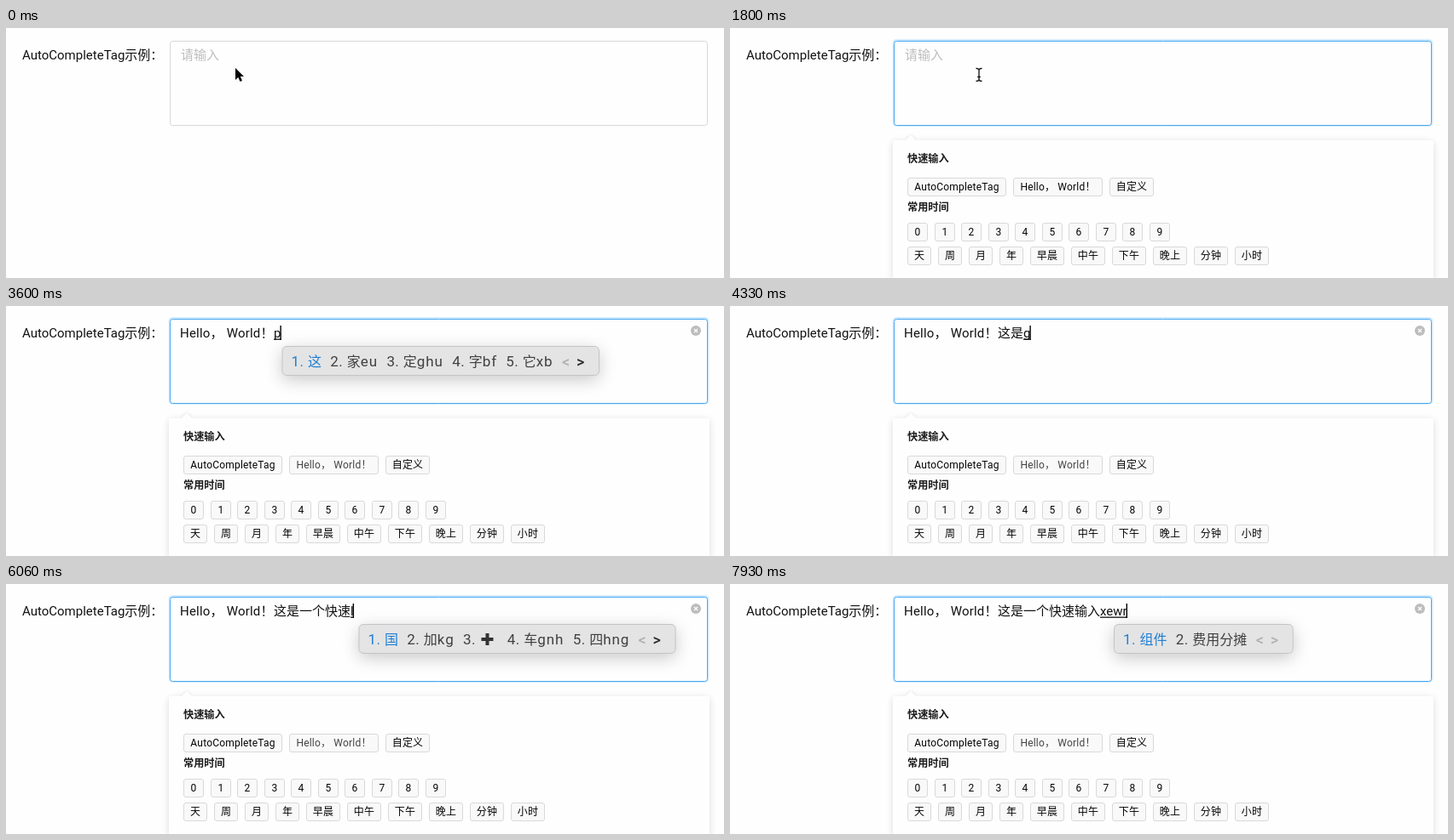
Write an HTML page with a canvas that moves like this. It is 842 by 294 pixels and loops after 8 s.

```html
<!DOCTYPE html>
<html lang="zh-CN">
<head>
<meta charset="utf-8">
<title>AutoCompleteTag</title>
<style>
html, body { margin: 0; width: 100%; height: 100%; overflow: hidden; background: #fefefe; }
canvas { display: block; width: 842px; height: 294px; }
</style>
</head>
<body>
<canvas id="stage"></canvas>
<script>
const W = 842, H = 294, LOOP = 8000;
const BG = '#fefefe', INK = '#111';
const FAMILY = 'Roboto, "Noto Sans CJK SC", "Noto Sans CJK", sans-serif';
const canvas = document.getElementById('stage');
const ctx = canvas.getContext('2d');
const dpr = window.devicePixelRatio || 1;
canvas.width = W * dpr;
canvas.height = H * dpr;

const clamp = v => Math.max(0, Math.min(1, v));
const span = (t, a, b) => clamp((t - a) / (b - a));
const smooth = p => p * p * (3 - 2 * p);
const outCirc = p => Math.sqrt(1 - (p - 1) ** 2);
const mix = (a, b, p) => a + (b - a) * p;
const mixColor = (a, b, p) => `rgb(${a.map((v, i) => Math.round(mix(v, b[i], p)))})`;

function setFont(size, weight = 400, spacing = 0) {
  ctx.font = `${weight} ${size}px ${FAMILY}`;
  ctx.letterSpacing = spacing + 'px';
}

// y is the visual middle of the line
function label(str, x, y, size, color, weight, spacing) {
  setFont(size, weight, spacing);
  ctx.fillStyle = color;
  ctx.fillText(str, x, y + size * 0.37);
  return ctx.measureText(str).width;
}

function box(x, y, w, h, r, fill, stroke) {
  ctx.beginPath();
  ctx.roundRect(x, y, w, h, r);
  if (fill) { ctx.fillStyle = fill; ctx.fill(); }
  if (stroke) { ctx.strokeStyle = stroke; ctx.lineWidth = 1; ctx.stroke(); }
}

// shadow only outside the shape, so it never shows through a faded fill
function castShadow(shape, color, blur, dy) {
  const outside = new Path2D();
  outside.rect(-W, -H, 3 * W, 3 * H);
  outside.addPath(shape);
  ctx.save();
  ctx.clip(outside, 'evenodd');
  ctx.shadowColor = color;
  ctx.shadowBlur = blur * dpr;
  ctx.shadowOffsetY = dy * dpr;
  ctx.fillStyle = '#fff';
  ctx.fill(shape);
  ctx.restore();
}

// typing: [time, committed text, letters in progress, candidates]
const ONE = '一 五ghg 王ggg 不i 下hi';
const typing = [
  [3530, '', 'p', '这 家eu 定ghu 字bf 它xb'],
  [3800, '这', '', ''],
  [4000, '这', 'j', '是 时fy 日jjj 早hnh 电nv'],
  [4200, '这是', '', ''],
  [4330, '这是', 'g', ''],
  [4400, '这是', 'g', ONE],
  [4600, '这是一', '', ''],
  [4800, '这是一', 'w', '人 个hj 八tyt 们un 他bn'],
  [4930, '这是一', 'wh', '个 介jj 什fh'],
  [5130, '这是一个', '', ''],
  [5260, '这是一个', 'n', '民 快nw 已nn 书nh 必te'],
  [5400, '这是一个', 'nn', '忆 快w 恨ve'],
  [5530, '这是一个', 'nnw', '快'],
  [5660, '这是一个快', 'g', ONE],
  [5760, '这是一个快', 'gk', '吾 速ip'],
  [5860, '这是一个快', 'gkip', '速'],
  [5960, '这是一个快速', '', ''],
  [6060, '这是一个快速', 'l', '国 加kg + 车gnh 四hng'],
  [6260, '这是一个快速', 'lw', '办 输gj 罗qu'],
  [6460, '这是一个快速', 'lwt', '输 输入y'],
  [6600, '这是一个快速', 'lwty', '输入'],
  [6860, '这是一个快速输入', '', ''],
  [7260, '这是一个快速输入', 'x', '经 组eg 线gt 红aa 给wg'],
  [7460, '这是一个快速输入', 'xe', '组 组件wr'],
  [7600, '这是一个快速输入', 'xew', '组件r'],
  [7730, '这是一个快速输入', 'xewr', '组件 费用分摊']
];

const INSERT = 2930, TEXT_X = 204, TYPE_X = 314, LINE_Y = 31.4;

function caret(x) {
  ctx.fillStyle = '#000';
  ctx.fillRect(x, 23, 1.4, 17);
}

function field(t) {
  const hover = span(t, 130, 430), focus = span(t, 870, 1170);
  if (focus) {
    ctx.globalAlpha = focus;
    box(190.5, 13, 634, 103, 5, '#d3ebfd');
    ctx.globalAlpha = 1;
  }
  box(192.5, 15.5, 630, 99, 3, BG, mixColor([215, 215, 215], [70, 168, 240], hover));
  label('AutoCompleteTag示例：', 19, LINE_Y, 15, INK);
  if (t < INSERT) {
    label('请输入', 205, LINE_Y, 15, '#bdbdbd');
    if (t > 930 && (t - 930) % 1000 < 500) caret(204);
    return;
  }
  label('Hello， World！', TEXT_X, LINE_Y, 15, INK, 400, 0.2);
  clearIcon();
  const step = typing.filter(s => s[0] <= t).pop() || [0, '', '', ''];
  const start = TYPE_X + label(step[1], TYPE_X, LINE_Y, 15, INK);
  const wide = label(step[2], start, LINE_Y, 15, INK);
  if (step[2]) ctx.fillRect(start, 38.5, wide, 1.3);
  caret(start + wide - 1);
}

function clearIcon() {
  ctx.beginPath();
  ctx.arc(809, 29, 6, 0, 7);
  ctx.fillStyle = '#bdbdbd';
  ctx.fill();
  ctx.beginPath();
  for (const d of [-2, 2]) {
    ctx.moveTo(809 - d, 27);
    ctx.lineTo(809 + d, 31);
  }
  ctx.strokeStyle = BG;
  ctx.lineWidth = 1.2;
  ctx.stroke();
}

function candidate(str, n, x, draw) {
  const color = n === 1 ? '#1f7fd2' : '#404040';
  const head = n + '. ';
  setFont(17, 400, 0.4);
  let w = ctx.measureText(head).width;
  if (draw) label(head, x, 65, 17, color, 400, 0.4);
  if (str === '+') {
    if (draw) {
      ctx.fillStyle = '#333';
      ctx.fillRect(x + w + 2, 63, 14, 4);
      ctx.fillRect(x + w + 7, 58, 4, 14);
    }
    return w + 22;
  }
  for (const p of str.match(/[a-z]+|[^a-z]+/g)) {
    const latin = /[a-z]/.test(p);
    const size = latin ? 17 : 16, gap = latin ? 0.9 : 0;
    setFont(size, 400, gap);
    const pw = ctx.measureText(p).width;
    if (draw) label(p, x + w, 65, size, color, 400, gap);
    w += pw;
  }
  return w;
}

function imePopup(t) {
  const step = typing.filter(s => s[0] <= t).pop();
  if (!step || !step[3]) return;
  const items = step[3].split(' ');
  setFont(15);
  const left = TYPE_X + ctx.measureText(step[1]).width + (step[2].length > 1 ? 16 : 9.5);
  const flow = draw => items.reduce((x, s, i) => x + candidate(s, i + 1, x, draw) + 10.4, left + 11);
  const end = flow(false);
  const shape = new Path2D();
  shape.roundRect(left + 0.5, 47.5, end + 43 - left, 34, 5);
  castShadow(shape, 'rgba(0,0,0,.22)', 20, 5);
  ctx.fillStyle = '#e4e4e5';
  ctx.fill(shape);
  ctx.strokeStyle = '#c4c4c6';
  ctx.lineWidth = 1;
  ctx.stroke(shape);
  flow(true);
  label('<', end, 65, 18, '#b2b2b2', 500);
  label('>', end + 17, 65, 18, items.length > 2 ? '#2c2c2c' : '#b2b2b2', 500);
}

function tag(str, x, y, w, hovered) {
  box(x + 0.5, y, w - 1, 21, 2.5, '#f9f9f9', '#d9d9d9');
  setFont(12, 400, 0.2);
  const tw = ctx.measureText(str).width;
  label(str, x + (w - tw) / 2, y + 10.5, 12, hovered ? '#444' : '#050505', 400, 0.2);
}

function panel(t) {
  const p = span(t, 1065, 1265);
  if (!p) return;
  const s = mix(0.8, 1, outCirc(p));
  ctx.save();
  ctx.globalAlpha = outCirc(p);
  ctx.translate(190, 114);
  ctx.scale(s, s);
  ctx.translate(-190, -114);
  const shape = new Path2D();
  shape.roundRect(191, 132, 634, 164, 3);
  const nub = new Path2D('M206 132L212 126L218 132Z');
  castShadow(nub, 'rgba(0,0,0,.14)', 4, 0);
  castShadow(shape, 'rgba(0,0,0,.14)', 8, 2);
  ctx.fillStyle = BG;
  ctx.fill(shape);
  ctx.fill(nub);

  label('快速输入', 208, 153.5, 12.2, '#1c1c1c', 600);
  label('常用时间', 208, 210.5, 12.2, '#1c1c1c', 600);
  tag('AutoCompleteTag', 208, 176.5, 116);
  tag('Hello， World！', 332, 176.5, 105, t > 2520);
  tag('自定义', 445, 176.5, 52);
  for (let i = 0; i < 10; i++) tag(String(i), Math.round(208 + i * 31.55), 229.5, 24);
  let x = 208;
  for (const word of '天 周 月 年 早晨 中午 下午 晚上 分钟 小时'.split(' ')) {
    const w = 16 + 12 * word.length;
    tag(word, x, 257.5, w);
    x += w + 8;
  }
  ctx.restore();
}

const ARROW = 'M0 0V14L3.3 11L5.5 16L8 15L5.8 10H10Z';
const HAND = 'M-1.5 .5Q0-1.2 1.2 .6L2.4 5Q4 4 4.8 5.4Q6.4 4.6 7.2 6.2Q9 5.6 9.2 7.6' +
  'Q9.8 11 8 13V15.5H1V14L-3.5 9Q-4.2 7 -2 7.6L.2 9Z';
const BEAM = 'M-3.5-7.5Q0-7.5 0-5.5Q0-7.5 3.5-7.5M0-5.5V5.5M-3.5 7.5Q0 7.5 0 5.5Q0 7.5 3.5 7.5M-1.8 2.5H1.8';

function pointer(t) {
  if (t >= 3500) return;
  const a = smooth(span(t, 130, 600)), b = smooth(span(t, 1800, 2600));
  const x = mix(mix(269, 292, a), 378, b);
  const y = mix(mix(47, 55, a), 181, b);
  ctx.save();
  ctx.translate(x, y);
  if (t >= 200 && y < 115) {
    ctx.strokeStyle = INK;
    ctx.lineWidth = 1.3;
    ctx.stroke(new Path2D(BEAM));
  } else {
    const hand = y > 176;
    const shape = new Path2D(hand ? HAND : ARROW);
    ctx.lineJoin = 'round';
    ctx.lineWidth = hand ? 1.1 : 2;
    ctx.strokeStyle = hand ? INK : '#fff';
    ctx.fillStyle = hand ? '#fff' : '#000';
    if (hand) ctx.fill(shape);
    ctx.stroke(shape);
    if (!hand) ctx.fill(shape);
  }
  ctx.restore();
  if ((t >= 800 && t < 930) || (t >= 2720 && t < 2900)) {
    ctx.beginPath();
    ctx.arc(x, y - 1, 29, 0, 7);
    ctx.strokeStyle = '#080808';
    ctx.lineWidth = 3;
    ctx.stroke();
  }
}

function draw(t) {
  ctx.setTransform(dpr, 0, 0, dpr, 0, 0);
  ctx.fillStyle = BG;
  ctx.fillRect(0, 0, W, H);
  panel(t);
  field(t);
  imePopup(t);
  pointer(t);
}

const began = performance.now();
function tick() {
  draw((performance.now() - began) % LOOP);
  requestAnimationFrame(tick);
}
tick();
</script>
</body>
</html>
```
